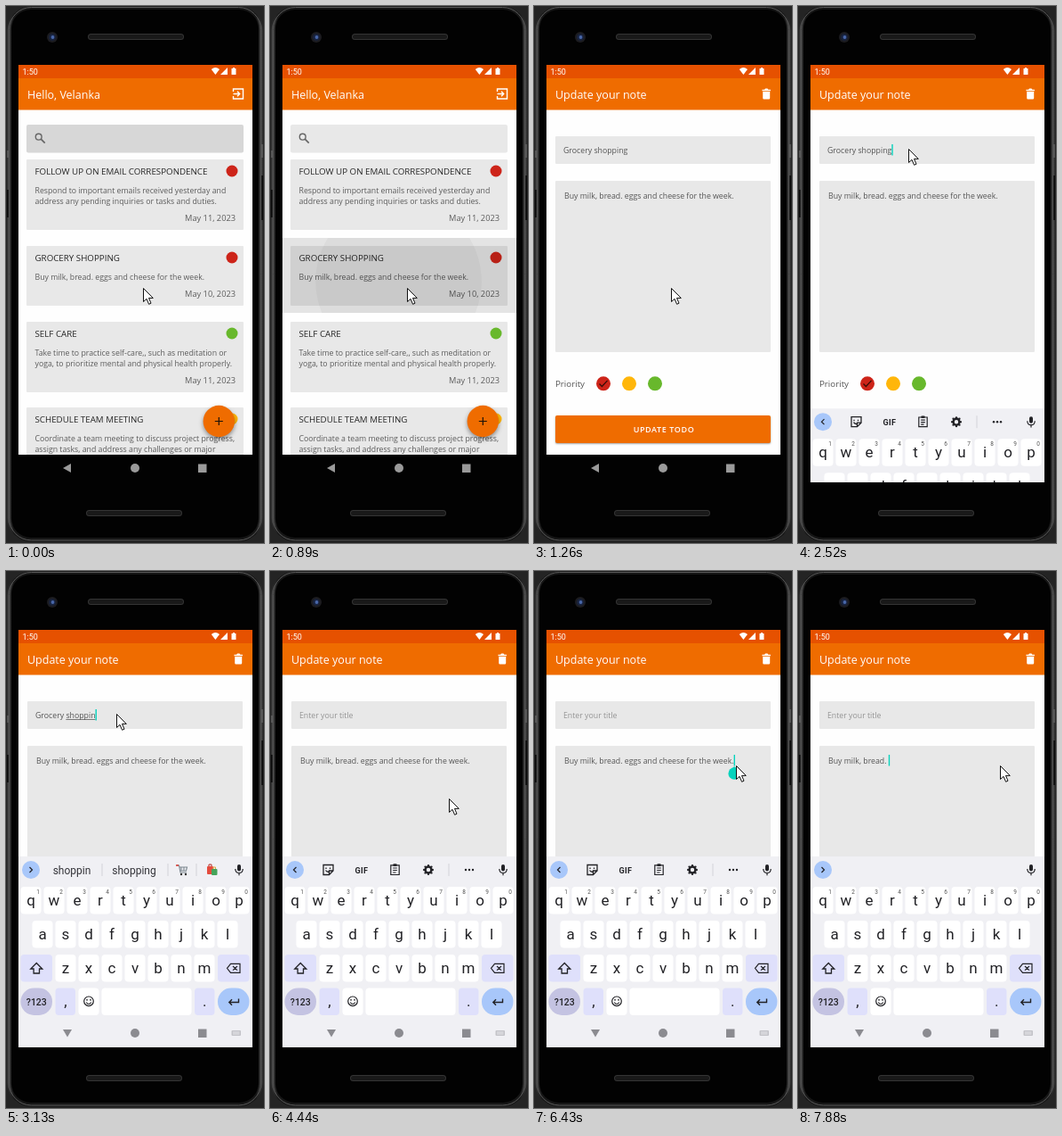
Recreate the animation shown at these times as an HTML page with a canvas. Size 290 px wide and 602 px high, loop 8000 ms.

```html
<!DOCTYPE html>
<html lang="en">
<head>
<meta charset="utf-8">
<title>Todo app demo</title>
<style>
html, body { margin: 0; width: 100%; height: 100%; overflow: hidden; background: #242424; }
canvas { display: block; width: 290px; height: 602px; }
</style>
</head>
<body>
<canvas id="stage"></canvas>
<script>
const W = 290, H = 602, LOOP = 8000;
const canvas = document.getElementById('stage');
const dpr = window.devicePixelRatio || 1;
canvas.width = W * dpr;
canvas.height = H * dpr;
const c = canvas.getContext('2d');

const SANS = '"Open Sans", "Noto Sans", sans-serif';
const ROBOTO = 'Roboto, "Noto Sans", sans-serif';
const ORANGE = '#ef6c00', RED = '#cd2419', GREEN = '#68b82c', AMBER = '#ffb60a';
const BOX = '#e8e8e8', TEAL = '#06d3bd', INK = '#222226', BLUE = '#a8c7fa', LILAC = '#dfe0fb';
const TITLE = 'Grocery shopping';
const NOTE = 'Buy milk, bread. eggs and cheese for the week.';

const TICKS = [0, 500, 770, 890, 1010, 1140, 1260, 1530, 1680, 1830, 2260, 2520, 2640, 2760,
  2890, 3010, 3130, 3270, 3390, 3510, 3630, 3750, 3870, 4170, 4290, 4440, 4740, 4860, 4980,
  5100, 5230, 5350, 5500, 5650, 5920, 6040, 6160, 6280, 6430, 6710, 6830, 6950, 7070, 7220,
  7370, 7490, 7640, 7760, 7880];

const POINTER = [[0, 154, 316], [1530, 171, 263], [1680, 138, 174], [1830, 124, 160],
  [4290, 187, 246], [4440, 201, 255], [4740, 201, 238], [4860, 200, 222], [4980, 199, 214],
  [5500, 220, 217], [5650, 227, 218]];

const CARDS = [
  { y: 172, h: 79, dot: RED, head: 'FOLLOW UP ON EMAIL CORRESPONDENCE', date: 'May 11, 2023',
    body: ['Respond to important emails received yesterday and', 'address any pending inquiries or tasks and duties.'] },
  { y: 269, h: 67, dot: RED, head: 'GROCERY SHOPPING', date: 'May 10, 2023', body: [NOTE] },
  { y: 354, h: 79, dot: GREEN, head: 'SELF CARE', date: 'May 11, 2023',
    body: ['Take time to practice self-care,, such as meditation or', 'yoga, to prioritize mental and physical health properly.'] },
  { y: 450, h: 79, dot: AMBER, head: 'SCHEDULE TEAM MEETING', date: '',
    body: ['Coordinate a team meeting to discuss project progress,', 'assign tasks, and address any challenges or major'] }
];

const clamp = (v, lo, hi) => Math.max(lo, Math.min(hi, v));
const between = (t, a, b) => t >= a && t < b;

function rect(x, y, w, h, fill, r = 0) {
  c.fillStyle = fill;
  c.beginPath();
  c.roundRect(x, y, w, h, r);
  c.fill();
}

function disc(x, y, r, fill) {
  c.fillStyle = fill;
  c.beginPath();
  c.arc(x, y, r, 0, Math.PI * 2);
  c.fill();
}

function ring(x, y, r, color, width = 1) {
  c.strokeStyle = color;
  c.lineWidth = width;
  c.beginPath();
  c.arc(x, y, r, 0, Math.PI * 2);
  c.stroke();
}

function path(d, x, y, fill, stroke, width = 1) {
  const shape = new Path2D(d);
  c.save();
  c.translate(x, y);
  if (fill) { c.fillStyle = fill; c.fill(shape); }
  if (stroke) { c.strokeStyle = stroke; c.lineWidth = width; c.stroke(shape); }
  c.restore();
}

function text(s, x, y, size, color, { weight = 400, align = 'left', font = SANS, spacing = 0 } = {}) {
  c.font = `${weight} ${size}px ${font}`;
  c.letterSpacing = spacing + 'px';
  c.textAlign = align;
  c.fillStyle = color;
  c.fillText(s, x, y);
  const width = c.measureText(s).width;
  c.letterSpacing = '0px';
  return width;
}

function withShadow(color, blur, dy, draw) {
  c.save();
  c.shadowColor = color;
  c.shadowBlur = blur * dpr;
  c.shadowOffsetY = dy * dpr;
  draw();
  c.restore();
}

function drawPhone() {
  rect(0, 0, W, H, '#242424');
  const edge = c.createLinearGradient(0, 0, W, 0);
  edge.addColorStop(0, '#4d4d4d');
  edge.addColorStop(0.03, '#161616');
  edge.addColorStop(0.97, '#161616');
  edge.addColorStop(1, '#4d4d4d');
  rect(1.5, 0.5, 287, 600, edge, 27);
  c.strokeStyle = '#5a5a5a';
  c.lineWidth = 1;
  c.beginPath();
  c.roundRect(3.5, 1.5, 283, 597.5, 25);
  c.stroke();
  rect(6, 4, 278, 592, '#020202', 22);
  rect(1, 162, 2, 8, '#555');
  rect(1, 206, 2, 31, '#111');
  rect(287, 155, 2, 15, '#555');
  rect(287, 190, 2, 50, '#111');
  disc(52, 35, 6, '#1c1c20');
  disc(52, 35, 3.8, '#18233f');
  disc(52.5, 35, 1.9, '#4866a8');
  for (const [x, y] of [[92, 31], [90, 565]]) {
    rect(x, y, 108, 7, '#343434', 3.5);
    rect(x + 1, y + 1, 106, 5, '#191919', 2.5);
  }
}

function drawBars(title, icon) {
  rect(14, 66, 263, 15, '#e65100');
  rect(14, 81, 263, 35.5, ORANGE);
  text('1:50', 18.5, 76.8, 9, '#fff', { font: ROBOTO });
  path('M0 2Q4.6 -2 9.2 2L4.6 8Z', 230.8, 69, '#fff');
  path('M8 0V8H0Z', 241, 69, '#fff');
  rect(253.5, 70, 5, 7, '#fff', 0.6);
  rect(255, 69, 2, 2, '#fff');
  text(title, 24, 104, 12.5, '#fff', { weight: 500 });
  if (icon === 'exit') {
    path('M0 3V0H11V11H0V8M0 5.5H7M4.5 2.8L7.2 5.5L4.5 8.2', 255.5, 93, null, '#fff', 1.4);
  } else {
    path('M0 1.2H2.6L3.5 0H6L6.9 1.2H9.4V2.7H0ZM.7 3.6H8.7V10.8Q8.7 12 7.5 12H1.9Q.7 12 .7 10.8Z', 256.5, 92.5, '#fff');
  }
}

function drawList(t) {
  rect(14, 66, 263, 437, '#fefefe');
  drawBars('Hello, Velanka', 'exit');
  rect(23, 133, 244, 31.5, t < 500 ? '#d7d7d7' : BOX, 2);
  ring(36.7, 146.7, 3.4, '#666', 1.4);
  path('M0 0L4.5 4.5', 39.2, 149.2, null, '#666', 1.7);
  for (const card of CARDS) {
    rect(23, card.y, 244, card.h, BOX, 1);
    text(card.head, 32.5, card.y + 16.5, 9.75, '#262626');
    card.body.forEach((line, i) => text(line, 32.5, card.y + 38 + i * 12.2, 8.75, '#5c5c5c'));
    text(card.date, 258, card.y + card.h - 10, 9.25, '#5c5c5c', { align: 'right' });
    disc(254, card.y + 13, 6.5, card.dot);
  }
  if (t >= 770) drawRipple(clamp((t - 680) / 400, 0, 1));
  withShadow('rgba(0,0,0,.4)', 5, 2.5, () => disc(239.3, 465.5, 17.7, ORANGE));
  path('M-4.5 0H4.5M0 -4.5V4.5', 239.3, 465.5, null, '#1c1208', 1.2);
}

function drawRipple(p) {
  c.save();
  c.beginPath();
  c.rect(14, 260, 263, 84);
  c.clip();
  rect(14, 260, 263, 84, `rgba(0,0,0,${Math.min(0.1, p * 0.2)})`);
  disc(154 - p * 18, 316 - p * 14, 25 + p * 130, 'rgba(0,0,0,.035)');
  c.restore();
}

function drawCaret(x, top) {
  rect(x, top, 1.4, 12.5, TEAL);
}

function fieldText(s, x, y) {
  const width = text(s, x, y, 8.75, '#555');
  const word = /\w+$/.exec(s);
  return { width, word: word ? word[0] : '', start: c.measureText(s.replace(/\w+$/, '')).width };
}

function drawEditor(t) {
  rect(14, 66, 263, 437, '#fefefe');
  drawBars('Update your note', 'trash');
  rect(24, 146, 242, 31, BOX, 1);
  rect(24, 196, 242, 192, BOX, 1);

  const titleLength = t < 3130 ? 16 : Math.round(15 * clamp((3870 - t) / 740, 0, 1));
  const noteLength = t < 6710 ? NOTE.length : Math.ceil(46 - 29 * (t - 6590) / 1290);
  const onTitle = t < 5100;
  const title = fieldText(TITLE.slice(0, titleLength), 33, 164.5);
  if (!titleLength) text('Enter your title', 33, 164.5, 8.75, '#949494');
  const note = fieldText(NOTE.slice(0, noteLength), 34, 215.5);

  const active = onTitle ? title : note;
  const left = onTitle ? 33 : 34, base = onTitle ? 164.5 : 215.5;
  const editing = onTitle ? t >= 2890 : t >= 6710;
  if (editing && active.word) rect(left + active.start, base + 1.5, active.width - active.start, 0.8, '#555');

  const titleCaret = between(t, 2260, 4170) || between(t, 4740, 5100);
  const noteCaret = between(t, 5100, 5500) || t >= 5920;
  if (titleCaret) drawCaret(left + active.width, 155);
  if (noteCaret) drawCaret(left + active.width, 206);
  if (between(t, 5100, 6710)) {
    const x = left + active.width + 0.5;
    path('M0 -8L5 -3H-5Z', x, 227, TEAL);
    disc(x, 227, 6.7, TEAL);
  }

  text('Priority', 24, 427, 9.75, '#555');
  [RED, AMBER, GREEN].forEach((color, i) => disc(78 + i * 29, 423.3, 8, color));
  path('M-4.5 .2L-1.6 3.2L4.6 -3.4', 78, 423.3, null, '#3a0d08', 1.3);
  withShadow('rgba(0,0,0,.35)', 2, 1, () => rect(24, 459, 242, 31, ORANGE, 2));
  text('UPDATE TODO', 146, 478, 9, '#fff', { weight: 600, align: 'center', spacing: 0.6 });
  return editing ? active.word : '';
}

function drawNav() {
  path('M0 0L9 -5V5Z', 64, 518, '#9a9a9a');
  disc(145, 518, 5, '#9a9a9a');
  rect(216, 513.5, 9.5, 9.5, '#9a9a9a');
}

function key(x, y, w, fill = '#fff', r = 4) {
  rect(x, y, w, 30.5, fill, r);
}

function drawKeys() {
  const letter = (ch, x, y) => text(ch, x, y, 17, INK, { align: 'center', font: ROBOTO });
  ['qwertyuiop', 'asdfghjkl', 'zxcvbnm'].forEach((row, r) => {
    const x0 = [28, 41, 67][r], y = 354 + r * 38;
    [...row].forEach((ch, i) => {
      const x = x0 + i * 26;
      key(x - 11.5, y, 23);
      letter(ch, x, y + 21);
      if (r === 0) text(String((i + 1) % 10), x + 8, y + 8, 6.5, '#555', { align: 'center', font: ROBOTO });
    });
  });
  key(16.5, 430, 35.5, LILAC);
  path('M0 -6L6.5 .5H3.2V5.5H-3.2V.5H-6.5Z', 34.3, 445.5, null, INK, 1.3);
  key(238, 430, 35.5, LILAC);
  path('M-7.5 0L-3.5 -5H7V5H-3.5ZM-1 -2.3L4 2.3M4 -2.3L-1 2.3', 256, 445.3, null, INK, 1.2);

  const y = 467.5;
  key(16.5, y, 35.5, '#c4c3e2', 15);
  text('?123', 34.3, 486.8, 10.5, INK, { weight: 500, align: 'center', font: ROBOTO });
  key(55.5, y, 22.5, LILAC);
  letter(',', 67, 488);
  key(81.5, y, 23);
  ring(93, 482.3, 5.3, INK, 1.2);
  disc(91, 480.8, 0.9, INK);
  disc(95, 480.8, 0.9, INK);
  path('M-2.8 0Q0 4 2.8 0', 93, 483.5, null, INK, 1.1);
  key(107.5, y, 101);
  key(212, y, 22.5, LILAC);
  letter('.', 223.3, 488);
  key(238, y, 35.5, BLUE, 15);
  path('M5.5 -4V0H-5M-2 -3.2L-5.2 0L-2 3.2', 256, 483.5, null, INK, 1.4);
}

function drawTools() {
  path('M-5.5 -5.5H5.5V1L1 5.5H-5.5ZM1 5.5V1H5.5M-3 .5Q-1.5 3 1 2M-2.5 -2.5V-1M2 -2.5V-1', 65.5, 335, null, INK, 1.3);
  text('GIF', 103, 338.5, 9, INK, { weight: 700, align: 'center', font: ROBOTO, spacing: 0.4 });
  path('M-4.7 -4.7H4.7V6H-4.7ZM-2.3 -1.5H2.3M-2.3 1H2.3M-2.3 3.5H1', 140.5, 334.5, null, INK, 1.2);
  rect(138.3, 328.3, 4.4, 2.6, INK, 1);
  ring(178, 335, 3.4, INK, 2.4);
  for (let i = 0; i < 8; i++) {
    const a = i * Math.PI / 4;
    disc(178 + Math.cos(a) * 4.8, 335 + Math.sin(a) * 4.8, 1.2, INK);
  }
  rect(200.5, 328, 1, 14, '#d2d2d8');
  [220, 224, 228].forEach(x => disc(x, 335, 1.2, INK));
}

function drawSuggestions(word) {
  const full = [...TITLE.split(' '), ...NOTE.replace(/[.,]/g, '').split(' ')].find(w => w.startsWith(word)) || word;
  const label = (s, x) => text(s, x, 339.5, 12, '#333338', { align: 'center', font: ROBOTO });
  label(word, 74);
  label(full === word ? word + 's' : full, 144);
  [107.5, 181.5, 213.5].forEach(x => rect(x, 328, 1, 14, '#d2d2d8'));
  if (!word.startsWith('shopp')) return;
  path('M-6 -5H-3.5L-2 3H5M-3 -3H5.5L4.5 1H-2.3M-1 -3V1M2 -3V1', 198, 335, null, '#7c8790', 1.1);
  path('M-7 -5H-4', 198, 335, null, '#d8423a', 1.6);
  disc(197, 340, 1.2, '#333');
  disc(202, 340, 1.2, '#333');
  rect(226, 331, 7, 9, '#e54b3d', 1);
  path('M0 0V-2H3V0', 228, 331, null, '#b52e27', 1);
  rect(231, 334, 6.5, 7, '#45a35a', 1);
  path('M0 0V-2H2.5V0', 233, 334, null, '#dca83f', 1);
}

function drawToolbar(t, word) {
  let tools = 0;
  if (!word) {
    if (t < 5100 || between(t, 6430, 6710)) tools = 1;
    else if (between(t, 5920, 6430)) tools = (t - 5840) / 800;
  }
  disc(28, 335, 10, BLUE);
  path(tools === 1 ? 'M1.5 -3L-1.5 0L1.5 3' : 'M-1.5 -3L1.5 0L-1.5 3', 28, 335, null, INK, 1.2);
  if (word) drawSuggestions(word);
  c.globalAlpha = tools;
  if (tools) drawTools();
  c.globalAlpha = 1;
  rect(260, 329, 4, 7.5, INK, 2);
  path('M-4.2 -1Q-4.2 3.5 0 3.5Q4.2 3.5 4.2 -1M0 3.5V6.3', 262, 335, null, INK, 1.2);
}

function drawKeyboard(t, word) {
  const rise = clamp((t - 2440) / 450, 0, 1);
  c.save();
  c.beginPath();
  c.rect(14, 66, 263, 468);
  c.clip();
  c.translate(0, 214 * Math.pow(1 - rise, 2.5));
  rect(14, 320, 263, 214, '#f0f0f4');
  drawToolbar(t, word);
  drawKeys();
  path('M0 0H10L5 8.5Z', 64, 514, '#8b8b90');
  disc(145, 518, 5, '#8b8b90');
  rect(216, 513.5, 9.5, 9.5, '#8b8b90');
  rect(253.5, 515, 10.5, 6, '#c3c3c8', 1);
  path('M1.5 2H9M1.5 4H9', 253.5, 515, null, '#f0f0f4', 0.8);
  c.restore();
}

function drawPointer(t) {
  const [, x, y] = POINTER.filter(p => p[0] <= t).pop();
  path('M.5 .5V15.5L4 12.3L6.6 18.3L9 17.2L6.5 11.4H11.3Z', x, y, '#fff', '#111', 1);
}

function render(t) {
  c.setTransform(dpr, 0, 0, dpr, 0, 0);
  drawPhone();
  drawNav();
  if (t < 1260) {
    c.save();
    c.beginPath();
    c.rect(14, 66, 263, 437);
    c.clip();
    drawList(t);
    c.restore();
  }
  if (t >= 1140) {
    c.save();
    if (t < 1260) {
      c.globalAlpha = 0.6;
      c.translate(0, 10);
    }
    const word = drawEditor(t);
    c.restore();
    if (t >= 2520) drawKeyboard(t, word);
  }
  drawPointer(t);
}

function loop(now) {
  const t = now % LOOP;
  render(TICKS.filter(tick => tick <= t).pop());
  requestAnimationFrame(loop);
}
render(0);
requestAnimationFrame(loop);
</script>
</body>
</html>
```
